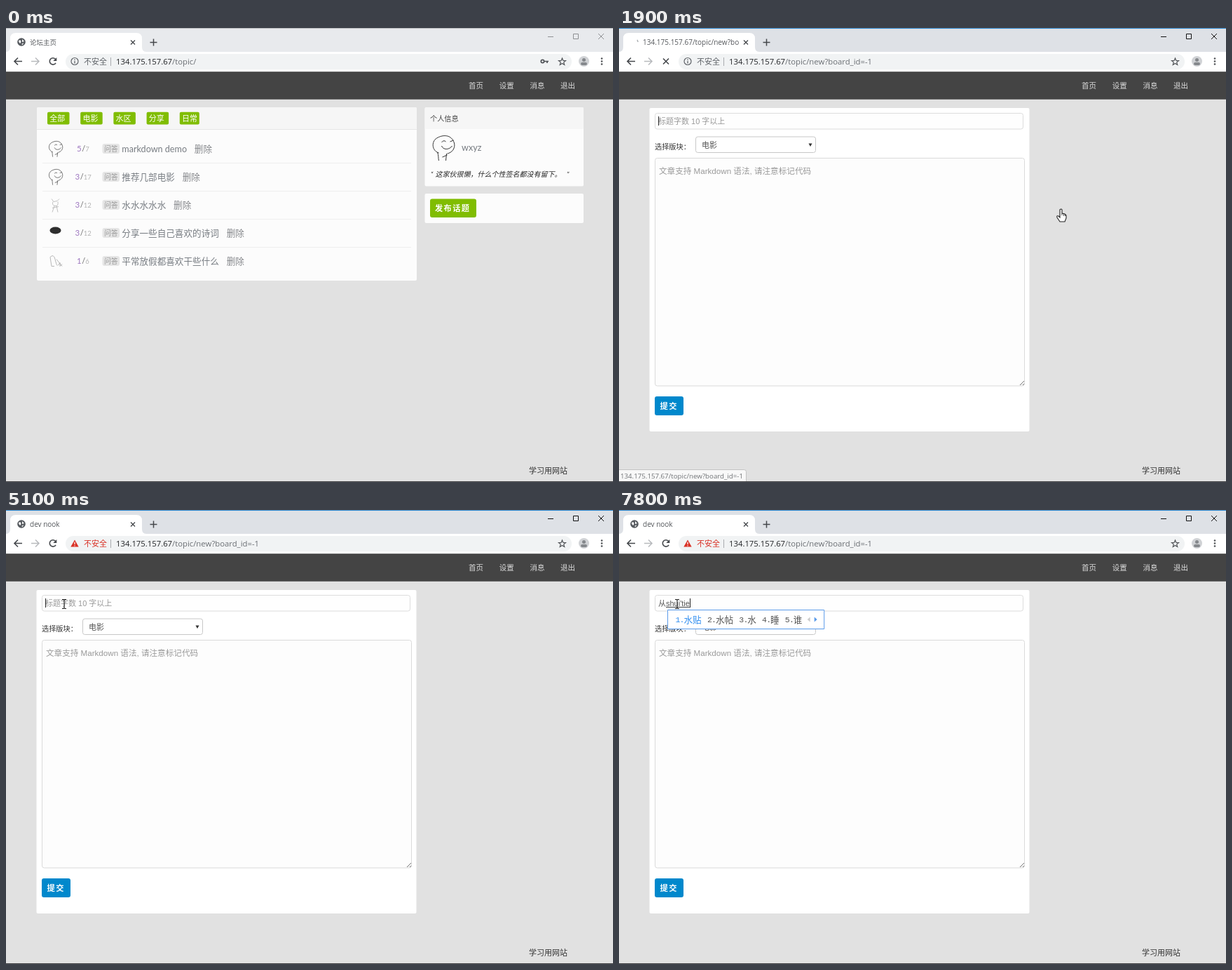
Recreate the animation shown at these times as an HTML page with a canvas. Size 866x647 px, loop 8 s.

```html
<!DOCTYPE html>
<html lang="zh-CN">
<head>
<meta charset="utf-8">
<title>论坛</title>
<style>
html, body { margin: 0; width: 100%; height: 100%; overflow: hidden; background: #e1e1e1; }
canvas { display: block; width: 866px; height: 647px; }
</style>
</head>
<body>
<canvas id="stage" width="866" height="647"></canvas>
<script>
const ctx = document.getElementById('stage').getContext('2d');
const LOOP = 8000;
const CJK = '"Noto Sans CJK SC", "Noto Sans CJK", sans-serif';
const UI = '"Open Sans", ' + CJK;
const BODY = 'Lato, ' + CJK;
const FIELD = '"Liberation Sans", ' + CJK;
const HOST = '134.175.157.67';
const NEW_PATH = '/topic/new?board_id=-1';

// ---------- helpers ----------
function box(x, y, w, h, fill, r = 0, stroke) {
  ctx.beginPath();
  ctx.roundRect(x, y, w, h, r);
  if (fill) { ctx.fillStyle = fill; ctx.fill(); }
  if (stroke) { ctx.strokeStyle = stroke; ctx.lineWidth = 1; ctx.stroke(); }
}

// Draws text centred vertically on cy and returns its right end.
function text(str, x, cy, size, color, family = BODY, style = '', spacing = 0) {
  ctx.font = `${style} ${size}px ${family}`;
  ctx.letterSpacing = spacing + 'px';
  ctx.fillStyle = color;
  ctx.fillText(str, x, cy + size * 0.37);
  return x + ctx.measureText(str).width;
}

function path(d, x, y, { scale = 1, stroke, fill, width = 1 } = {}) {
  ctx.save();
  ctx.translate(x, y);
  ctx.scale(scale, scale);
  const p = new Path2D(d);
  if (fill) { ctx.fillStyle = fill; ctx.fill(p); }
  if (stroke) { ctx.strokeStyle = stroke; ctx.lineWidth = width / scale; ctx.stroke(p); }
  ctx.restore();
}

function disc(x, y, r, fill, stroke, width = 1) {
  ctx.beginPath();
  ctx.arc(x, y, r, 0, Math.PI * 2);
  if (fill) { ctx.fillStyle = fill; ctx.fill(); }
  if (stroke) { ctx.strokeStyle = stroke; ctx.lineWidth = width; ctx.stroke(); }
}

const latest = (list, t) => list.filter(item => item.at <= t).pop();

// ---------- browser window ----------
function drawFavicon(t, loading) {
  if (loading) {
    const a = t / 160;
    ctx.beginPath();
    ctx.arc(22, 20, 5, a, a + 0.7);
    ctx.strokeStyle = '#a0a4a8';
    ctx.lineWidth = 1.3;
    ctx.stroke();
    return;
  }
  disc(22, 20, 5.8, '#565a5f');
  path('M-4-2C-1-4 0-1-1 1S-4 0-4-2M1-4L4-1 1 0zM0 3L3 1 2 4z', 22, 20, { fill: '#fff' });
}

function drawChrome(t, s) {
  box(0, 0, 866, 34, s.active ? '#dee1e6' : '#e8eaed');
  box(0, 0, 866, 1, s.active ? '#2b88d0' : '#b9bbbe');
  path('M0 27Q6 27 6 20V8Q6 0 14 0H186Q194 0 194 8V20Q194 27 200 27z', 0, 7, { fill: '#fff' });
  box(0, 34, 866, 28, '#fff');
  drawFavicon(t, s.loading);

  ctx.save();
  ctx.beginPath();
  ctx.rect(30, 8, 141, 25);
  ctx.clip();
  text(s.title, 34, 20.5, s.title === '论坛主页' ? 9.5 : 10, '#55585c', UI);
  ctx.restore();

  path('M-3-3L3 3M3-3L-3 3', 181, 20.5, { stroke: '#44474b', width: 1.3 });
  path('M-5 0H5M0-5V5', 210.5, 20.5, { stroke: '#44474b', width: 1.5 });
  const control = s.active ? '#111' : '#8e9093';
  path('M773 12.5H781M809.5 8.5H816.5V15.5H809.5zM845 8L853 16M853 8L845 16', 0, 0, { stroke: control });

  path('M6 0H-5M0-5L-5 0 0 5', 17, 47.5, { stroke: '#45484c', width: 1.6 });
  path('M-6 0H5M0-5L5 0 0 5', 42, 47.5, { stroke: '#b8babd', width: 1.5 });
  if (s.loading) {
    path('M-4-4L4 4M4-4L-4 4', 67, 47.5, { stroke: '#45484c', width: 1.6 });
  } else {
    path('M4 2.4A4.7 4.7 0 1 1 3.4-3.3', 67, 47.5, { stroke: '#45484c', width: 1.6 });
    path('M5.3-5.5V-.5H.3z', 67, 47.5, { fill: '#45484c' });
  }

  box(85, 37, 722, 22, '#f1f3f4', 11);
  const red = '#d93025';
  if (s.warning) {
    path('M0-5L5.7 5H-5.7z', 98, 47.5, { fill: red });
    path('M0-2V1.5M0 2.7V4', 98, 47.5, { stroke: '#fff', width: 1.2 });
  } else {
    disc(98, 47.5, 5, null, '#5f6368', 1.2);
    path('M0-3V-1.6M0-.5V3', 98, 47.5, { stroke: '#5f6368', width: 1.3 });
  }
  text('不安全', 111, 47.5, 11, s.warning ? red : '#5f6368', UI);
  box(149, 42, 1, 12, '#a9acaf');
  const end = text(HOST, 157, 47.5, 11.3, '#222427', UI);
  text(s.path, end, 47.5, 11.3, '#6b6f74', UI);

  if (!s.compose) {
    disc(765.5, 47.5, 2.2, null, '#505357', 1.7);
    path('M768 47.5H774M772 48V50', 0, 0, { stroke: '#505357', width: 1.7 });
  }
  path('M0-5L1.4-1.6 5-1.4 2.2 .9 3.2 4.5 0 2.5-3.2 4.5-2.2 .9-5-1.4-1.4-1.6z', 793.5, 48, { stroke: '#505357', width: 1.2 });
  disc(824.5, 47.5, 7.5, '#d0d2d5');
  disc(824.5, 45.5, 2.5, '#85888c');
  box(820, 49, 9, 4, '#85888c', 2);
  for (const y of [43.5, 47.5, 51.5]) disc(850, y, 1.3, '#505357');
}

function drawSiteFrame() {
  box(0, 62, 866, 585, '#e1e1e1');
  box(0, 62.3, 866, 39.4, '#444');
  ['首页', '设置', '消息', '退出'].forEach((label, i) =>
    text(label, 660 + i * 43.7, 82, 10.5, '#dcdcdc'));
  text('学习用网站', 746, 630.8, 11, '#333');
  box(0, 646, 866, 1, '#39393c');
}

// ---------- topic list ----------
const DOODLE = 'M9 25C-1 22-2 9 6 4S27-2 31 11C33 19 27 25 21 26' +
  'M13 10Q16 6 19 9M25 9L30 7M13 15C15 21 24 21 28 15' +
  'M7 24C9 29 8 33 9 36M20 26L19 36M14 31L21 28';

const smallDoodle = y => path(DOODLE, 61, y - 11.5, { scale: 0.63, stroke: '#555', width: 0.8 });

const avatars = [
  smallDoodle,
  smallDoodle,
  y => path('M-5-9L-2-5 3-6 6-9M-3-5Q-5 0 0 1T4-5M-1 1L-4 10M2 1L4 10M-4 4L5 2', 70, y, { stroke: '#b2b2b2', width: 0.8 }),
  y => { ctx.beginPath(); ctx.ellipse(70.5, y - 4, 8, 5, 0, 0, 7); ctx.fillStyle = '#2e2e2e'; ctx.fill(); },
  y => path('M-8-6Q-3-11-1-3T2 6M-8-6L-6 7H-2M1-3L9 7M3 6L6 2 6 7 9 4', 71, y, { stroke: '#a5a5a5', width: 0.8 })
];

const topics = [
  ['5', '7', 'markdown demo'],
  ['3', '17', '推荐几部电影'],
  ['3', '12', '水水水水水'],
  ['3', '12', '分享一些自己喜欢的诗词'],
  ['1', '6', '平常放假都喜欢干些什么']
];

function drawTopics(hover) {
  box(44, 113, 542, 247, '#fcfcfc', 2);
  box(44, 113, 542, 31, '#f6f6f6', 2);
  box(44, 144, 542, 1, '#e6e6e6');
  ['全部', '电影', '水区', '分享', '日常'].forEach((label, i) => {
    const x = 59 + i * 47.2;
    box(x, 119.8, i === 4 ? 28 : 31.5, 17.6, '#80bd01', 2);
    text(label, x + 3.2, 128.7, 11, '#fff', BODY, '500');
  });

  topics.forEach(([replies, views, title], i) => {
    const y = 172.5 + i * 40;
    avatars[i](y);
    const left = views.length > 1 ? 98.5 : 101;
    let x = text(replies, left, y - 0.5, 11.5, '#9e78c0');
    x = text('/', x + 0.5, y - 0.5, 11, '#666');
    text(views, x, y, 9.5, '#b4b4b4');
    box(137.5, y - 7.5, 24.5, 14, '#e5e5e5', 3);
    text('问答', 140, y - 0.5, 9.8, '#999');
    x = text(title, 165.3, y - 0.2, 12.6, '#777c82');
    text('删除', x + 10.8, y - 0.2, 12.6, '#85878b');
    if (i < 4) box(52, y + 19.5, 526, 1, '#eee');
  });

  box(597.5, 113, 226.5, 112.5, '#fcfcfc', 2);
  box(597.5, 113, 226.5, 31, '#f6f6f6', 2);
  text('个人信息', 605, 129, 10.2, '#444');
  path(DOODLE, 608.5, 153, { stroke: '#333' });
  text('wxyz', 650, 170.6, 12.6, '#777c82');
  text('“', 606, 208, 10, '#333', BODY, 'italic');
  text('这家伙很懒，什么个性签名都没有留下。', 612.5, 208, 10, '#222', BODY, 'italic');
  text('”', 800, 208, 10, '#333', BODY, 'italic');

  box(597.5, 236, 226.5, 42, '#fcfcfc', 2);
  box(605, 243.5, 66, 26.5, hover ? '#6ba44e' : '#80bd01', 3);
  text('发布话题', 612, 257, 11.2, '#fff', BODY, 'bold', 1.4);
}

// ---------- new topic form ----------
// done: committed text, comp: text being composed, words: suggestions
const edits = [
  { at: 1900 },
  { at: 3600, done: 'c' },
  { at: 5000 },
  { at: 5400, comp: 'c', words: '从 才 次 错 草' },
  { at: 5900, comp: 'cong', words: '从 聪 丛 葱 匆' },
  { at: 6000, done: '从' },
  { at: 6500, done: '从', comp: 's', words: '是 上 说 三 送' },
  { at: 6600, done: '从', comp: 'sh', words: '上 是 什么 说 时' },
  { at: 6800, done: '从', comp: 'shu', words: '书 数据 舒服 熟悉 树林' },
  { at: 7000, done: '从', comp: 'shu', words: '书 数据 舒服 树林 熟悉' },
  { at: 7400, done: '从', comp: 'shui', words: '水 睡 谁 税 说' },
  { at: 7500, done: '从', comp: "shui't", words: '水土 水塘 水桶 水田 水头' },
  { at: 7600, done: '从', comp: "shui'ti", words: '水体 水提 睡 水 谁' },
  { at: 7800, done: '从', comp: "shui'tie", words: '水贴 水帖 水 睡 谁' }
];

function drawSuggestions(x, words) {
  const list = words.split(' ');
  const size = 12.6;
  const width = 74 + list.join('').length * size + list.length * 12.4;
  box(x + 0.5, 142.5, width - 1, 27, '#fff', 0, '#5a9bea');
  let pen = x + 11.5;
  list.forEach((word, i) => {
    const color = i ? '#555' : '#2f8df0';
    text(i + 1 + '.', pen, 156, 11.5, color, '"Liberation Mono", monospace', '', -0.8);
    pen = text(word, pen + 12, 156, size, color) + 8.2;
  });
  path('M3-3.5V3.5L-1 0z', pen, 156, { fill: '#ccc' });
  path('M0-3.5V3.5L4 0z', pen + 9, 156, { fill: '#5a9bea' });
}

function drawForm(t) {
  const edit = latest(edits, t);
  const { done = '', comp = '', words } = edit;
  box(43.5, 114, 542, 461, '#fff', 2);
  box(51.5, 121.5, 525, 22.5, '#fefefe', 3, '#dcdcdc');
  text('选择版块：', 51, 169, 10.2, '#333');
  box(109.5, 155, 171, 22.5, '#fff', 3, '#c8c8c8');
  text('电影', 118, 167, 11, '#555');
  path('M-2.5-2H2.5L0 2.5z', 273, 166.5, { fill: '#333' });
  box(51.5, 185.5, 527, 324.5, '#fdfdfd', 3, '#dadada');
  text('文章支持 Markdown 语法, 请注意标记代码', 57, 203.5, 11.6, '#999', FIELD);
  path('M572 509L578 503M576 509L578 507', 0, 0, { stroke: '#777' });
  box(51, 525, 41, 27, '#08c', 3);
  text('提交', 58.5, 538.5, 11.3, '#fff', BODY, 'bold', 1.4);

  if (!done && !comp) text('标题字数 10 字以上', 56, 133, 11, '#999', FIELD);
  const start = text(done, 56, 133, 11, '#555', FIELD);
  const end = text(comp, start, 133, 11, '#555', FIELD);
  if (comp) box(start, 138, end - start, 1, '#444');
  if ((t - edit.at) % 1000 < 500) box(Math.round(end), 126, 1, 13, '#222');
  if (words) drawSuggestions(Math.round(start) + 2, words);
}

// ---------- pointer ----------
const route = [
  [100, 745, 357], [300, 662, 338], [500, 564, 324], [700, 588, 306], [900, 630, 290],
  [1100, 631, 277], [1300, 631, 263], [1500, 631, 257], [1800, 631, 257], [1900, 630, 258],
  [2000, 630, 258], [2500, 63, 124], [2700, 83, 134]
];

function pointerAt(t) {
  const i = route.findIndex(p => p[0] > t);
  if (i < 0) return route[route.length - 1].slice(1);
  const [t0, x0, y0] = route[i - 1], [t1, x1, y1] = route[i];
  const k = (t - t0) / (t1 - t0);
  return [x0 + (x1 - x0) * k, y0 + (y1 - y0) * k];
}

function drawPointer(kind, x, y) {
  if (kind === 'hand') {
    path('M-1 1Q1-1 2 1V6L6 7 8 9V13L6 18H-1L-5 12Q-6 9-3 10L-1 12z', x, y, { fill: '#fff', stroke: '#222', width: 1.1 });
    path('M2 6V9M4.5 7V10M6.5 8V10', x, y, { stroke: '#222', width: 0.8 });
  } else if (kind === 'beam') {
    path('M-3-6.5H-1L0-5.5 1-6.5H3M0-5.5V5.5M-3 6.5H-1L0 5.5 1 6.5H3', x, y, { stroke: '#222', width: 1.1 });
  } else {
    path('M0 0V12L2.8 9.5 5 14.5 7 13.5 4.9 8.8H8.5z', x, y, { fill: '#fff', stroke: '#222' });
  }
}

// ---------- timeline ----------
function render(time) {
  const t = Math.floor(time / 100) * 100;
  const compose = t >= 1900;
  const loading = t >= 1700 && t < 2200;
  const hover = t >= 1200 && !compose;
  let title = '论坛主页';
  if (compose) title = loading ? HOST + NEW_PATH : 'dev nook';

  drawSiteFrame();
  drawChrome(t, {
    compose, loading, title,
    active: t >= 1700,
    warning: t >= 3600,
    path: compose ? NEW_PATH : '/topic/'
  });
  if (compose) drawForm(t); else drawTopics(hover);

  if (t >= 1300 && t < 2300) {
    box(-4.5, 629.5, 186, 22, '#f8f8f8', 3, '#c3c3c3');
    text(HOST + NEW_PATH, 2, 638, 9.7, '#707376', UI);
    box(0, 646, 866, 1, '#39393c');
  }

  if (t >= 100) {
    const [x, y] = pointerAt(t);
    const kind = t >= 1200 && t <= 2000 ? 'hand' : compose && x < 579 ? 'beam' : 'arrow';
    drawPointer(kind, x, y);
  }
}

function tick() {
  render(performance.now() % LOOP);
  requestAnimationFrame(tick);
}
tick();
</script>
</body>
</html>
```
